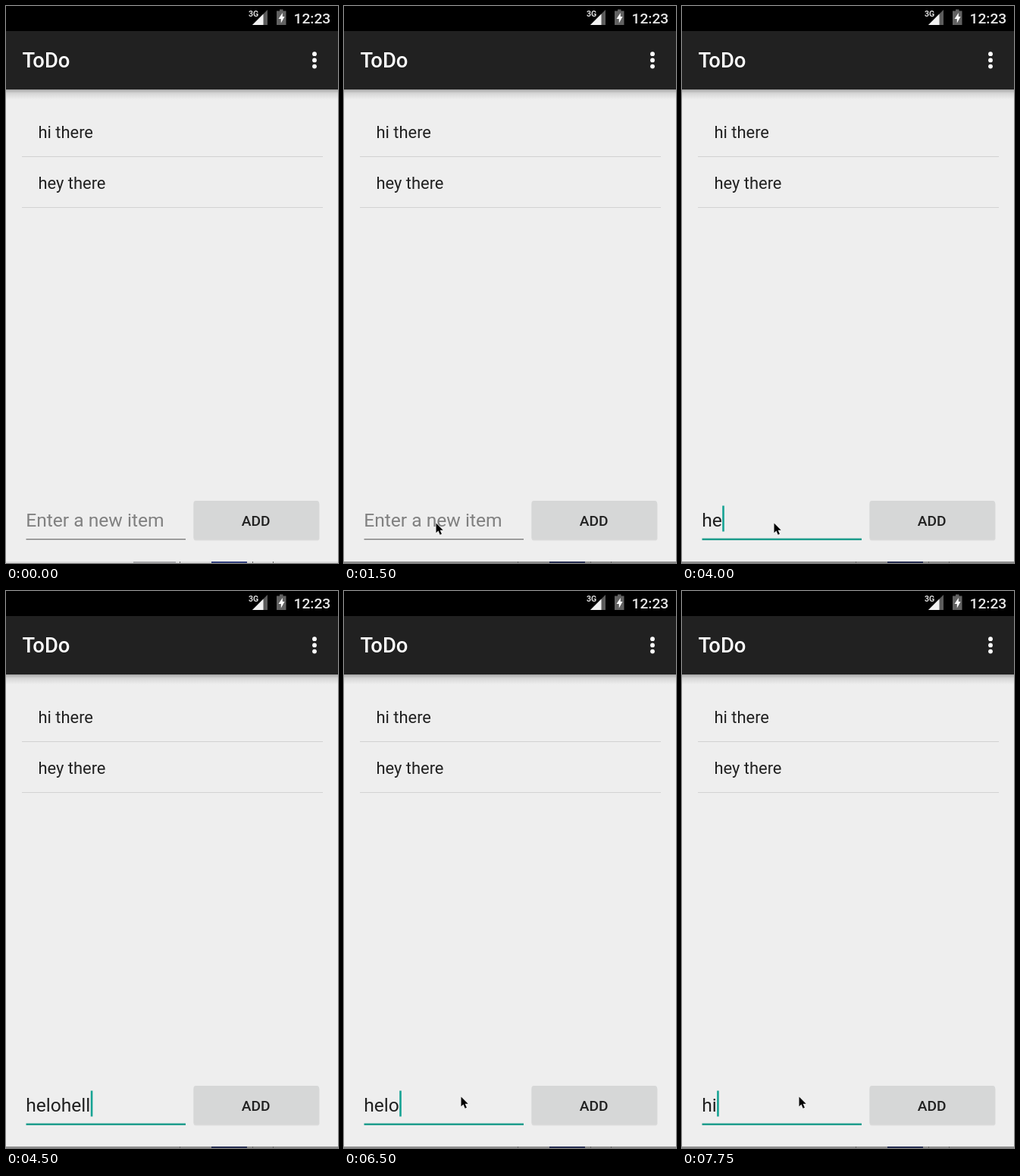
Recreate the animation shown at these times as an HTML page. Size 438x734 px, loop 8000 ms.

```html
<!DOCTYPE html>
<html lang="en">
<head>
<meta charset="utf-8">
<title>ToDo</title>
<style>
html, body { margin: 0; width: 100%; height: 100%; overflow: hidden; background: #eee; }
svg { display: block; font-family: Roboto, "Noto Sans", sans-serif; }
text { white-space: pre; }
.item { font-size: 21.9px; fill: #212121; }
.field { font-size: 24.6px; }
.medium { font-weight: 500; }
</style>
</head>
<body>
<svg width="438" height="734" viewBox="0 0 438 734">
  <defs>
    <linearGradient id="shade" x2="0" y2="1">
      <stop offset="0" stop-color="#000" stop-opacity=".3"/>
      <stop offset=".4" stop-color="#000" stop-opacity=".1"/>
      <stop offset="1" stop-color="#000" stop-opacity="0"/>
    </linearGradient>
  </defs>
  <rect width="438" height="734" fill="#eee"/>

  <!-- status bar -->
  <rect width="438" height="33" fill="#000"/>
  <text x="320" y="14" font-size="10.5" font-weight="700" fill="#ddd">3G</text>
  <path d="M325 25 L345 5 V25Z" fill="#5c5c5c"/>
  <path d="M325 25 L339.5 10.5 V25Z" fill="#f2f2f2"/>
  <path d="M361 4.5h4.5v2h4V25h-12.500V6.500h4z" fill="#626262"/>
  <path d="M364.800 9 L359.500 17 h3.300 v5.500 L367.500 14 h-2.700z" fill="#fff"/>
  <text x="379.500" y="23" font-size="19.200" fill="#e8e8e8" class="medium">12:23</text>

  <!-- app bar -->
  <rect y="33" width="438" height="77" fill="#212121"/>
  <rect y="110" width="438" height="13" fill="url(#shade)"/>
  <text x="21.500" y="81" font-size="27.400" fill="#fff" class="medium">ToDo</text>
  <g fill="#fff">
    <circle cx="407" cy="63.200" r="2.900"/>
    <circle cx="407" cy="71.400" r="2.900"/>
    <circle cx="407" cy="79.600" r="2.900"/>
  </g>

  <!-- list -->
  <text x="42.500" y="173.500" class="item">hi there</text>
  <text x="42.500" y="240.500" class="item">hey there</text>
  <path d="M21 198.500H418M21 265.500H418" stroke="#d2d2d2"/>

  <!-- input row -->
  <rect x="247.500" y="653.500" width="166" height="51" rx="3" fill="#000" opacity=".08"/>
  <rect x="247.500" y="652" width="165.500" height="51" rx="3" fill="#d6d7d7"/>
  <text x="329.700" y="684.500" font-size="19.200" text-anchor="middle" fill="#212121" class="medium">ADD</text>
  <text id="entry" x="26.200" y="685.500" class="field"></text>
  <rect id="line" x="26.500" width="210.500"/>
  <rect id="caret" y="658.500" width="2.600" height="34" fill="#16a394"/>

  <!-- bottom edge -->
  <g id="edgeA">
    <rect y="732" width="438" height="2" fill="#dcdcdc"/>
    <rect x="168" y="732" width="56" height="2" fill="#a9a9ab"/>
    <rect x="271" y="732" width="47" height="2" fill="#36437f"/>
  </g>
  <g id="edgeB">
    <rect y="732" width="438" height="2" fill="#8f8f8f"/>
    <rect x="271" y="732" width="47" height="2" fill="#282f52"/>
  </g>
  <path d="M229.500 732v2M325.500 732v2M352.500 732v2" stroke="#666"/>

  <path id="mouse" d="M1.500 1.500V14.300L4.400 11.600L6.700 16.700L8.900 15.700L6.700 10.800H10.700Z"
    fill="#000" stroke="#fff" stroke-width="1" paint-order="stroke"/>
</svg>
<script>
const LOOP = 8000;
const HINT = "Enter a new item";

const mouseSteps = [
  [0, null], [500, [284, 34]], [750, [246, 336]], [1000, [129, 693]],
  [1250, [120, 680]], [4250, null], [5000, [209, 684]], [5250, [222, 686]],
  [5500, [175, 681]], [5750, [153, 665]]
];
const textSteps = [
  [0, ""], [4000, "he"], [4250, "helohel"], [4500, "helohell"], [6000, "helohe"],
  [6250, "heloh"], [6500, "helo"], [6750, "he"], [7000, ""], [7500, "h"], [7750, "hi"]
];
const caretSteps = [[0, false], [3000, true], [5000, false], [5500, true]];
const FOCUS = 4000;
const EDGE = 1500;

const el = id => document.getElementById(id);
const [entry, line, caret, mouse, edgeA, edgeB] =
  ["entry", "line", "caret", "mouse", "edgeA", "edgeB"].map(el);

const at = (steps, t) => steps.findLast(([start]) => start <= t)[1];
const set = (node, attrs) => {
  for (const key in attrs) node.setAttribute(key, attrs[key]);
};
const show = (node, on) => set(node, { visibility: on ? "visible" : "hidden" });

function draw(t) {
  const text = at(textSteps, t);
  entry.textContent = text || HINT;
  set(entry, { fill: text ? "#212121" : "#808080" });

  const width = text ? entry.getComputedTextLength() : 0;
  set(caret, { x: 26.6 + width });
  show(caret, at(caretSteps, t));

  const focused = t >= FOCUS;
  set(line, {
    y: focused ? 701.5 : 702,
    height: focused ? 2.5 : 1.4,
    fill: focused ? "#209d8d" : "#7d7d7d"
  });

  const pos = at(mouseSteps, t);
  show(mouse, pos);
  if (pos) set(mouse, { transform: `translate(${pos})` });

  show(edgeA, t < EDGE);
  show(edgeB, t >= EDGE);
}

const begin = performance.now();
function tick() {
  draw((performance.now() - begin) % LOOP);
  requestAnimationFrame(tick);
}
tick();
</script>
</body>
</html>
```
